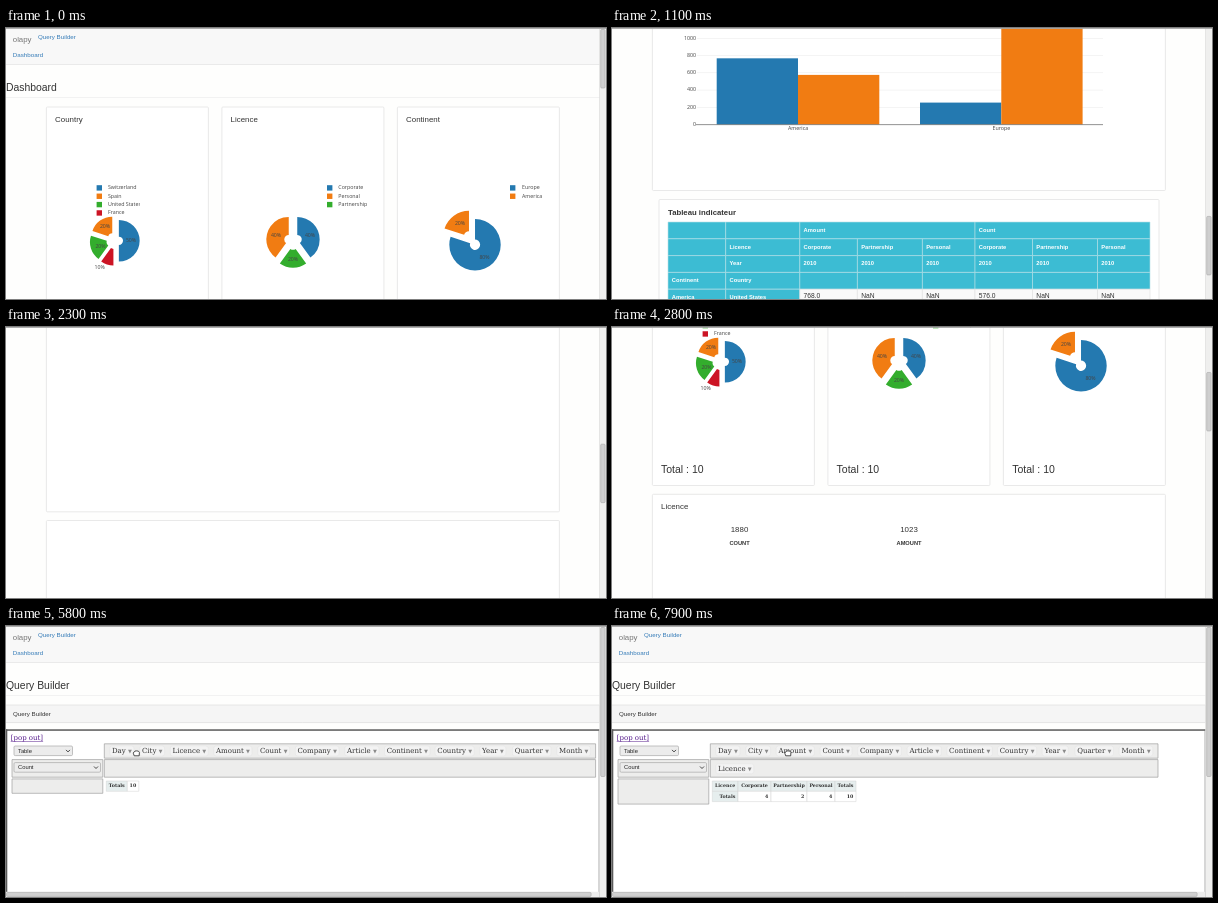
Animation of 600x271 px, one loop 8 s. Source, as an HTML page with a canvas:

```html
<!DOCTYPE html>
<html lang="en">
<head>
<meta charset="utf-8">
<title>Dashboard</title>
<style>
html, body { margin: 0; width: 100%; height: 100%; overflow: hidden; background: #fefefd; }
canvas { display: block; width: 600px; height: 271px; }
</style>
</head>
<body>
<canvas id="stage"></canvas>
<script>
const W = 600, H = 271, LOOP = 8000, STEP = 100;
const canvas = document.getElementById('stage');
const ctx = canvas.getContext('2d');
const ratio = window.devicePixelRatio || 1;
canvas.width = W * ratio;
canvas.height = H * ratio;

const SANS = '"Liberation Sans", Arial, sans-serif';
const OPEN = '"Open Sans", sans-serif';
const NOTO = '"Noto Sans", sans-serif';
const SERIF = '"DejaVu Serif", serif';
const BLUE = '#2479b0', ORANGE = '#f17c12', GREEN = '#33ad2d', RED = '#cc1424';
const INK = '#333', LINK = '#337ab7', PAPER = '#fefefd';

// Moments when the state changes
const HOVER = 3700, CLICK = 4100, RECEIVE = 4300, OPENED = 4700;
const LOADED = 5300, GRAB = 6200, DROP = 6700, RESULT = 7100;

const scrollKeys = [[200, 0], [1100, 757], [1500, 830], [1600, 830], [1800, 759], [2800, 178], [3000, 0]];
const cursorKeys = [
  [3100, 512, 160], [3700, 60, 24], [4000, 49.5, 16], [4700, 49.5, 16], [5200, 90, 112],
  [5500, 100, 140], [5800, 127, 124], [6100, 177, 124], [6200, 177, 124], [6700, 122, 142],
  [7100, 122, 142], [7800, 172.5, 124]
];

function at(keys, t) {
  if (t <= keys[0][0]) return keys[0].slice(1);
  for (let i = 1; i < keys.length; i++) {
    const a = keys[i - 1], b = keys[i];
    if (t <= b[0]) {
      const k = (t - a[0]) / (b[0] - a[0]);
      return a.slice(1).map((v, j) => v + (b[j + 1] - v) * k);
    }
  }
  return keys[keys.length - 1].slice(1);
}

function rect(x, y, w, h, fill) {
  ctx.fillStyle = fill;
  ctx.fillRect(x, y, w, h);
}

function box(x, y, w, h, fill, stroke, line = 0.6, radius = 0) {
  ctx.beginPath();
  ctx.roundRect(x, y, w, h, radius);
  ctx.fillStyle = fill;
  ctx.fill();
  ctx.strokeStyle = stroke;
  ctx.lineWidth = line;
  ctx.stroke();
}

function text(str, x, y, size, color = INK, family = SANS, align = 'left', weight = '') {
  ctx.font = `${weight} ${size}px ${family}`;
  ctx.textAlign = align;
  ctx.textBaseline = 'middle';
  ctx.fillStyle = color;
  ctx.fillText(str, x, y);
}

function bold(str, x, y, size, color, family = SANS, align = 'left') {
  text(str, x, y, size, color, family, align, 'bold');
}

function card(x, y, w, h, title) {
  box(x, y, w, h, '#fff', '#e4e4e4', 0.8, 1);
  if (title) text(title, x + 8.7, y + 13, 7.9);
}

function header(title, hover) {
  rect(0, 0, 594, 36.5, '#f8f8f8');
  rect(0, 36.2, 594, 0.8, '#e7e7e7');
  text('olapy', 6.8, 12, 7.8, '#777');
  if (hover) rect(0, 1, 594, 17.5, '#eee');
  text('Query Builder', 32, 9.7, 6.2, hover ? '#23527c' : LINK);
  text('Dashboard', 6.8, 27.4, 6.2, LINK);
  text(title, 0, 60, 10.4);
  rect(0, 69, 594, 0.7, '#eee');
}

// Slices run clockwise from the top, each pushed out along its middle
function pie(cx, cy, r, slices) {
  const turn = 2 * Math.PI;
  let from = 0;
  for (const [share, color, label, lx, ly] of slices) {
    const mid = (from + share / 2) * turn, pull = r * 0.2;
    const x = cx + Math.sin(mid) * pull, y = cy - Math.cos(mid) * pull;
    const a = from * turn - Math.PI / 2, b = a + share * turn;
    ctx.beginPath();
    ctx.arc(x, y, r, a, b);
    ctx.arc(x, y, r * 0.2, b, a, true);
    ctx.closePath();
    ctx.fillStyle = color;
    ctx.fill();
    text(label, lx, ly, 5.2, '#444', OPEN, 'center');
    from += share;
  }
}

function legend(x, names, gap = 11.3) {
  const colors = [BLUE, ORANGE, GREEN, RED];
  names.forEach((name, i) => {
    const y = 160 + i * 8.35;
    rect(x, y - 2.8, 5.4, 5.4, colors[i]);
    text(name, x + gap, y, 5.3, '#444', OPEN);
  });
}

function pies() {
  card(40.4, 79, 162, 257.5, 'Country');
  card(215.9, 79, 162, 257.5, 'Licence');
  card(391.4, 79, 162, 257.5, 'Continent');
  ctx.save();
  ctx.beginPath();
  ctx.rect(40, 150, 94, 50);
  ctx.clip();
  legend(90.6, ['Switzerland', 'Spain', 'United States', 'France']);
  ctx.restore();
  legend(321, ['Corporate', 'Personal', 'Partnership']);
  legend(504, ['Europe', 'America'], 12);
  pie(108.7, 212.8, 20.8, [
    [0.5, BLUE, '50%', 125, 213], [0.1, RED, '10%', 93.7, 240],
    [0.2, GREEN, '20%', 94.5, 219], [0.2, ORANGE, '20%', 99, 199]
  ]);
  pie(287, 212.8, 22.4, [
    [0.4, BLUE, '40%', 304, 207.5], [0.2, GREEN, '20%', 287, 231.5], [0.4, ORANGE, '40%', 270, 207.5]
  ]);
  pie(466, 212.6, 25.7, [[0.8, BLUE, '80%', 478.5, 229.5], [0.2, ORANGE, '20%', 454, 196]]);
  for (const x of [49, 224.6, 400.2]) text('Total : 10', x, 321.3, 10.5);
}

function totals() {
  card(40.4, 345.3, 513, 308, 'Licence');
  text('1880', 127.5, 380.5, 7.9, INK, SANS, 'center');
  text('1023', 297, 380.5, 7.9, INK, SANS, 'center');
  bold('COUNT', 127.5, 394, 5.7, INK, SANS, 'center');
  bold('AMOUNT', 297, 394, 5.7, INK, SANS, 'center');
}

function bars() {
  const base = 853.6, scale = 0.0863;
  card(40.4, 662, 513, 257.5);
  for (let v = 0; v <= 1200; v += 200) {
    const y = base - v * scale;
    if (v) rect(85, y - 0.25, 406, 0.5, '#e8e8e8');
    text(v, 84, y, 5.3, '#444', OPEN, 'right');
  }
  [['America', 768, 576], ['Europe', 255, 1304]].forEach(([name, amount, count], i) => {
    const x = 104.7 + i * 203.3;
    rect(x, base - amount * scale, 81.3, amount * scale, BLUE);
    rect(x + 81.3, base - count * scale, 81.3, count * scale, ORANGE);
    text(name, x + 81.3, base + 4, 5.3, '#444', OPEN, 'center');
  });
  rect(84, base - 0.3, 407, 0.8, '#777');
}

function table() {
  const edges = [56, 113.7, 187.8, 245.4, 310.4, 363, 420.5, 485.5, 538];
  const measures = ['Corporate', 'Partnership', 'Personal'];
  const nan = 'NaN', top = 951, rowH = 16.8, teal = '#3cbcd3';
  const rows = [
    ['', '', 'Amount', '', '', 'Count', '', ''],
    ['', 'Licence', ...measures, ...measures],
    ['', 'Year', ...Array(6).fill('2010')],
    ['Continent', 'Country', ...Array(6).fill('')],
    ['America', 'United States', '768.0', nan, nan, '576.0', nan, nan],
    ['Europe', 'France', '4.0', nan, nan, '2.0', nan, nan],
    ['', 'Spain', nan, '3.0', nan, nan, '925.0', nan],
    ['', 'Switzerland', nan, nan, '248.0', nan, nan, '377.0']
  ];
  card(47, 928.5, 500, 172);
  bold('Tableau indicateur', 56, 942, 7.75, INK);
  rows.forEach((row, r) => {
    const y = top + r * rowH;
    row.forEach((cell, c) => {
      const merged = r === 0 && c > 1;
      if (merged && !cell) return;
      const x = edges[c], w = edges[merged ? c + 3 : c + 1] - x;
      const head = r < 4 || c < 2;
      box(x, y, w, rowH, head ? teal : r % 2 ? '#fff' : '#f9f9f9', head ? '#b5dfe6' : '#ddd', 0.6);
      if (head) bold(cell, x + 3.8, y + 8.2, 5.75, '#fff');
      else text(cell, x + 3.8, y + 7.4, 6.7);
    });
  });
}

function scrollbar(y, h) {
  rect(593.5, 0, 6.5, H, '#efefee');
  rect(593.3, 0, 0.6, H, '#d8d8d8');
  box(594.7, y, 4.4, h, '#cfcfcf', '#a8a8a8', 0.6, 1);
}

function status(str) {
  box(-1, 262.3, 117, 10, '#dcdcda', '#8c8c8c', 0.8, 1);
  text(str, 1.8, 267, 5.2, '#111', NOTO);
}

function dashboard(t) {
  const scroll = at(scrollKeys, t)[0];
  ctx.save();
  ctx.translate(0, -scroll);
  header('Dashboard', t >= HOVER);
  pies();
  totals();
  bars();
  table();
  ctx.restore();
  scrollbar(1.5 + scroll / 4.05, 58.5);
}

function pill(name, x, y) {
  ctx.font = `7px ${SERIF}`;
  const w = ctx.measureText(name).width;
  box(x - 2.2, y - 5, w + 10.4, 10, '#f3f3f3', '#e0e0e0', 0.4, 2.2);
  text(name, x, y, 7, INK, SERIF);
  const m = x + w + 4.2;
  ctx.beginPath();
  ctx.moveTo(m - 1.9, y - 1.2);
  ctx.lineTo(m + 1.9, y - 1.2);
  ctx.lineTo(m, y + 2.4);
  ctx.fillStyle = '#8a8a8a';
  ctx.fill();
}

function select(label, x, y, w) {
  box(x, y, w, 9.6, '#ececec', '#aaa', 0.7, 1.2);
  text(label, x + 4, y + 5, 5.8, '#222');
  ctx.beginPath();
  ctx.moveTo(x + w - 6.5, y + 3.9);
  ctx.lineTo(x + w - 4.5, y + 5.9);
  ctx.lineTo(x + w - 2.5, y + 3.9);
  ctx.strokeStyle = '#333';
  ctx.lineWidth = 0.9;
  ctx.stroke();
}

function cell(str, x, y, w, head, align = 'right') {
  box(x, y, w, 10.3, head ? '#e6eeee' : '#fff', '#d2d2d2', 0.5);
  const tx = align === 'center' ? x + w / 2 : x + w - 2.6;
  bold(str, tx, y + 5.2, 4.75, '#333', SERIF, align);
}

function pivot(grouped) {
  if (!grouped) {
    cell('Totals', 100.3, 155, 21, true, 'center');
    cell('10', 121.3, 155, 11.5, false);
    return;
  }
  const edges = [100.3, 126, 159, 195, 223, 244];
  const heads = ['Licence', 'Corporate', 'Partnership', 'Personal', 'Totals'];
  const values = ['Totals', '4', '2', '4', '10'];
  heads.forEach((name, i) => {
    const x = edges[i], w = edges[i + 1] - x;
    cell(name, x, 155, w, true, 'center');
    cell(values[i], x, 165.3, w, i === 0);
  });
}

function builder(t, cx, cy) {
  const names = ['Day', 'City', 'Licence', 'Amount', 'Count', 'Company', 'Article',
    'Continent', 'Country', 'Year', 'Quarter', 'Month'];
  const places = [106, 136, 166.5, 210, 254, 291.5, 341, 380.7, 431.3, 476, 508.8, 553];
  const dropped = t >= DROP, dragging = t >= GRAB && !dropped;
  const shift = dropped ? 43.6 : 0, grouped = t >= RESULT;

  header('Query Builder', false);
  box(-1, 79, 594.5, 17.6, '#f5f5f5', '#ddd', 0.7);
  text('Query Builder', 7, 88, 6.2);

  rect(0, 103.3, 594, 168, '#fff');
  rect(0, 103.3, 594, 1.5, '#5a5a5a');
  rect(0, 103.3, 1.3, 168, '#5a5a5a');
  rect(592.7, 103.3, 0.8, 168, '#777');
  text('[pop out]', 4.7, 112, 7, '#551a8b', SERIF);
  rect(4.7, 115.5, 32.4, 0.5, '#551a8b');

  const gray = '#909090', fill = '#ededec';
  const right = 589.6 - shift;
  box(98.3, 117.8, right - 98.3, 14.4, fill, gray);
  box(98.3, 133.6, right - 98.3, 17.6, fill, gray);
  box(6, 133.6, 90.8, 17.6, fill, gray);
  box(6, 152.9, 90.8, grouped ? 25.2 : 14.4, fill, gray);
  select('Table', 8, 120, 58.5);
  select('Count', 8, 136.6, 86.5);
  names.forEach((name, i) => {
    if (name === 'Licence') {
      if (t < GRAB) pill(name, places[i], 125);
    } else {
      pill(name, places[i] - (i > 2 ? shift : 0), 125);
    }
  });
  if (dropped) pill('Licence', 106, 142.8);
  pivot(grouped);
  if (dragging) pill('Licence', cx - 11, cy + 1);

  rect(0, 265.8, 593, 5.2, '#ececec');
  box(0.6, 266.4, 584.5, 4, '#d0d0d0', '#a8a8a8', 0.6, 1);
  scrollbar(1.5, 149);
}

function arrow(x, y) {
  const pts = [[0, 0], [0, 7.6], [1.8, 6], [3, 8.8], [4.2, 8.3], [3, 5.6], [5.5, 5.4]];
  ctx.beginPath();
  pts.forEach(([dx, dy]) => ctx.lineTo(x + dx, y + dy));
  ctx.closePath();
  ctx.fillStyle = '#fff';
  ctx.fill();
  ctx.strokeStyle = '#222';
  ctx.lineWidth = 0.9;
  ctx.stroke();
}

function hand(x, y) {
  ctx.beginPath();
  ctx.moveTo(x + 1.2, y + 5.8);
  ctx.lineTo(x + 0.3, y + 3.2);
  ctx.quadraticCurveTo(x + 0.2, y + 2.2, x + 1.2, y + 2.2);
  ctx.quadraticCurveTo(x + 1.6, y + 0.6, x + 3.4, y + 0.9);
  ctx.quadraticCurveTo(x + 5.8, y + 0.6, x + 6.4, y + 2.3);
  ctx.lineTo(x + 6.2, y + 5.8);
  ctx.closePath();
  ctx.fillStyle = '#fff';
  ctx.fill();
  ctx.strokeStyle = '#222';
  ctx.lineWidth = 0.8;
  ctx.stroke();
}

function draw(t) {
  const [cx, cy] = at(cursorKeys, t);
  ctx.setTransform(ratio, 0, 0, ratio, 0, 0);
  rect(0, 0, W, H, PAPER);
  if (t < OPENED) dashboard(t);
  else builder(t, cx, cy);
  rect(0, 0, W, 0.9, '#a4a4a4');

  if (t >= HOVER && t < LOADED) {
    status(t < CLICK ? '127.0.0.1:5000/query_builder'
      : t < RECEIVE ? 'En attente de 127.0.0.1…'
      : 'Données transférées depuis 127.0.0.1');
  }
  if (t >= 5600) hand(cx, cy);
  else if (t >= 3200) arrow(cx, cy);
}

const start = performance.now();
function tick() {
  const t = (performance.now() - start) % LOOP;
  draw(Math.floor(t / STEP) * STEP);
  requestAnimationFrame(tick);
}
tick();
</script>
</body>
</html>
```
